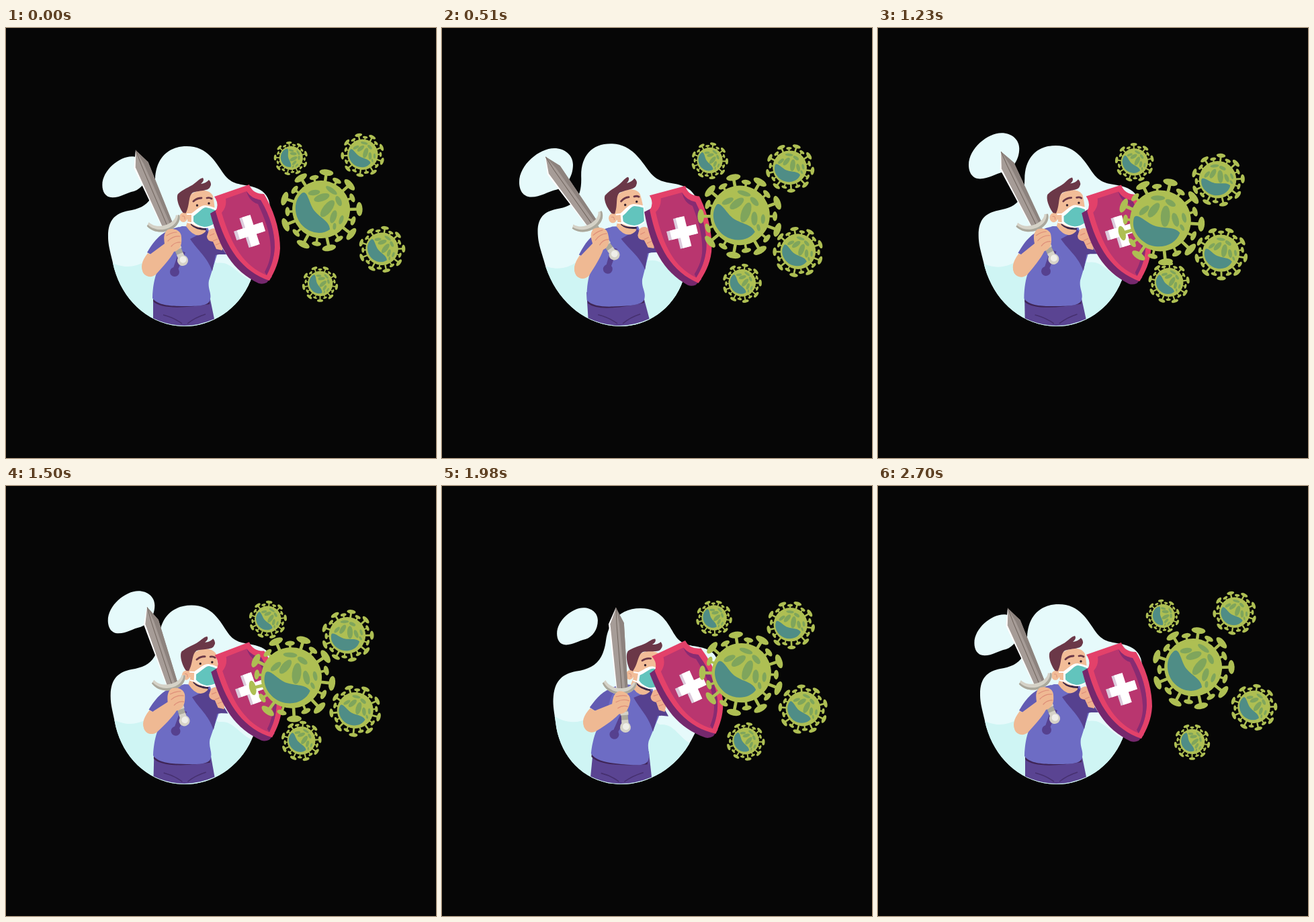
An HTML page that plays this animation: 640x640 px, repeating every 2730 ms.

```html
<!DOCTYPE html>
<html lang="en">
<head>
<meta charset="utf-8">
<title>Shield against viruses</title>
<style>
  html, body { margin: 0; width: 100%; height: 100%; overflow: hidden; background: #060606; }
  svg { display: block; width: 100vw; height: 100vh; }
</style>
</head>
<body>
<svg viewBox="0 0 640 640">
  <defs>
    <path id="cloud" d="M152 310C152 285 163 276 182 272C207 268 221 258 222 225C223 195 240 176 269 176C300 176 312 200 324 217C336 234 350 232 366 236C385 241 393 252 393 270C393 300 380 340 364 376C346 420 305 444 267 444C213 444 174 405 161 358C156 335 152 325 152 310Z"/>
    <clipPath id="cloudClip"><use href="#cloud"/></clipPath>
    <g id="virus">
      <g id="spikes" fill="#aebf53" stroke="#aebf53"></g>
      <circle cx="-1" cy="-1" r="43" fill="#aebf53"/>
      <path fill="#4f8d86" d="M-38 5C-37 -5 -18 8 -6 8C9 8 20 1 30 8C29 24 14 36 -4 36C-22 35 -38 22 -38 5Z"/>
      <g id="spots" fill="#7fa55c"></g>
    </g>
  </defs>

  <path id="puff" fill="#e6fafb" d="M-22 36C-35 36 -40 25 -40 14C-40 -12 -10 -36.5 12 -36.5C28 -36.5 40 -26 40 -12C40 6 30 20 16 25C2 28 -8 36 -22 36Z"/>

  <g id="backdrop">
    <use href="#cloud" fill="#e6fafb"/>
    <g clip-path="url(#cloudClip)">
      <path id="wave" fill="#cff5f4" d="M130 330C163 359 185 360 208 347C240 330 300 340 314 350C336 346 344 368 368 377V470H130Z"/>
    </g>
    <path fill="#5a4492" d="M219 394L219 432Q264 453.5 310 433L302 394Z"/>
    <path fill="none" stroke="#46306f" stroke-width="1.6" d="M234 427Q250 431 262 440M297 426Q281 431 270 440"/>
  </g>

  <g id="man">
    <path fill="#3f2556" d="M219 401Q240 413 303 405L303 411Q235 422 219 407Z"/>
    <path fill="#56418f" d="M296 300C308 306 318 322 328 337L312 337L300 345Z"/>
    <path fill="#625bb2" d="M258 296C232 302 222 314 210 334Q222 342 240 343Z"/>
    <path fill="#6d6cc4" d="M262 295C246 300 238 310 237 340C228 354 219 368 218 402C226 414 250 414 268 414C290 414 303 413 304 403C306 394 300 388 302 376L314 338L300 296Z"/>
    <path fill="#56418f" d="M274 314L299 301C307 310 315 322 317 337L312 338L307 362C299 340 286 332 274 314Z"/>
    <g id="shade" fill="#56418f"><circle cx="251" cy="363" r="7"/><path d="M258 331L267 334L255 362L248 360Z"/></g>
    <path fill="#efb993" d="M271 285L268 295Q283 317 297 303L296 288Z"/>
    <g id="head">
      <path fill="#3b2849" d="M275 290Q284 298 298 298L298 301Q282 301 275 293Z"/>
      <path fill="#f2bd98" d="M272 250C285 239 303 239 308 250C311 264 312 280 309 290L290 297C280 297 270 290 263 272Z"/>
      <path fill="#6b3848" d="M265 277C256 266 253 252 256 247C264 240 270 238 275 235C283 231 287 224 293 223Q296 227 290 232Q298 231 302 226Q307 231 304 236C302 243 290 241 278 245C271 250 274 262 268 275Z"/>
      <ellipse cx="264" cy="282" rx="6" ry="7" fill="#f2bd98"/>
      <path fill="none" stroke="#d9917b" stroke-width="1" d="M262 280Q267 279 266 285"/>
      <path fill="none" stroke="#6b3848" stroke-width="2.8" stroke-linecap="round" d="M279 258Q284 253 291 253M299 253Q303 252 306 254"/>
      <circle cx="284.5" cy="264" r="1.7" fill="#33202c"/>
      <circle cx="302" cy="261" r="1.7" fill="#33202c"/>
      <path fill="none" stroke="#fff" stroke-width="2" d="M269 277L279 277M270 289L279 291"/>
      <path fill="#fff" d="M276 276C285 270 289 264 297 264Q304 265 312 268L311 292Q304 298 295 298Q282 296 276 290Z"/>
      <path fill="#62c4bd" d="M279 280C287 275 292 267 298 267Q304 268 311 271L310 291Q303 296 295 296Q284 294 279 288Z"/>
    </g>
    <path fill="#efb08f" d="M302 301Q308 296 314 300L323 322L322 331L313 329L308 318Q299 317 299 310Z"/>
    <path fill="none" stroke="#dd8d78" stroke-width="1.2" d="M303 309L310 306M308 317L315 314M312 323L319 320"/>
  </g>

  <g id="sword">
    <path fill="#fff" d="M-9 -56L-13 -155L0 -179L0 -56Z"/>
    <path fill="#a69c97" d="M-8 -54L-10.5 -155L0 -178L10 -155L8 -54Z"/>
    <path fill="#8d837e" d="M0 -178L10 -155L8 -54L4 -54L3 -155Z"/>
    <path fill="none" stroke="#71665f" stroke-width="1" d="M0 -178L-1 -155L-1 -54"/>
    <path fill="#aaa89c" d="M-5 -52H5V-6H-5Z"/>
    <path fill="#d5d2c7" d="M-6 -23H6V-18H-6ZM-5 -11H5V-6H-5Z"/>
    <path fill="#d5d2c7" d="M-29 -68L-24 -72C-18 -56 11 -54 17 -66L22 -64C18 -43 -21 -44 -29 -68Z"/>
    <path fill="#aaa89c" d="M-29 -68C-21 -44 18 -43 22 -64L20 -65C14 -48 -17 -48 -27 -69Z"/>
    <circle r="8" fill="#d5d2c7"/>
    <circle cx="1" cy="-1" r="5" fill="#efeee9"/>
  </g>

  <g id="armBase">
    <path fill="#efb993" d="M211 335C201 348 200 357 205 365L220 368L236 342Q222 341 211 335Z"/>
    <g id="arm">
      <path fill="#efb993" d="M217 335C204 345 200 354 204 364C208 371 217 372 223 367C233 356 244 344 250 333C260 330 262 322 261 311C261 302 251 297 241 300C234 305 235 314 236 321Z"/>
      <path fill="none" stroke="#dd8d78" stroke-width="1.2" stroke-linecap="round" d="M239 309Q247 304 254 304M241 317Q249 309 259 310M246 325Q252 318 260 319"/>
    </g>
  </g>

  <g id="shield">
    <path fill="#75286d" d="M304 276L314 270L396 370L388 379Q382 382 376 380C338 362 318 330 304 276Z"/>
    <path fill="#e3416a" d="M310 251L362 233Q367 247 384 247C401 275 408 305 408 328C407 348 400 362 392 376C352 362 328 330 312 273Q318 262 310 251Z"/>
    <path fill="#b9366f" d="M327 254L358 243Q365 254 379 256C394 281 400 305 400 326C399 343 395 355 388 368C354 354 336 325 321 275Q329 266 327 254Z"/>
    <path fill="#882b72" d="M358 243Q365 254 379 256C394 281 400 305 400 326C399 343 395 355 388 368L385 363C391 352 395 340 394 326C393 305 386 285 375 262Q362 258 358 243Z"/>
    <g transform="translate(364 302) rotate(-18)">
      <path fill="#dccbdc" transform="translate(-3 0)" d="M-7 -23H7V-7H21V7H7V23H-7V7H-21V-7H-7Z"/>
      <path fill="#fff" d="M-6 -23H7V-7H21V7H7V23H-6V7H-19V-7H-6Z"/>
    </g>
  </g>

  <g id="viruses"></g>
</svg>
<script>
const $ = id => document.getElementById(id);
const place = (id, transform) => $(id).setAttribute('transform', transform);

function add(parent, tag, attrs) {
  const el = document.createElementNS('http://www.w3.org/2000/svg', tag);
  for (const name in attrs) el.setAttribute(name, attrs[name]);
  return $(parent).appendChild(el);
}

// Long and short spikes alternate around the virus.
for (let i = 0; i < 18; i++) {
  const long = i % 2 === 0;
  const reach = long ? 57 : 50;
  const transform = `rotate(${i * 20 - 42})`;
  add('spikes', 'path', { d: `M0 -41V${-reach}`, 'stroke-width': long ? 4.5 : 3.5, transform });
  add('spikes', 'ellipse', { cy: -reach, rx: long ? 10.5 : 7, ry: long ? 4.7 : 3.5, stroke: 'none', transform });
}

// x, y, rx, ry, angle
const spots = [
  [-13, -31, 10, 3.5, -14], [6, -29, 8, 4, 16], [-14, -13, 5.5, 12, 21], [4, -9, 6.5, 15, -12],
  [-27, -9, 4, 9, 32], [19, -8, 4.5, 10, -32], [30, -14, 3, 7, -30], [31, 0, 2.5, 5, -45]
];
for (const [x, y, rx, ry, angle] of spots)
  add('spots', 'ellipse', { rx, ry, transform: `translate(${x} ${y}) rotate(${angle})` });

const LOOP = 2730, END = 2700;
const times = [0, 510, 735, 960, 1500, 1980, 2340, END];

// Smooth periodic curve through one value per key time.
function curve(values) {
  const last = times.length - 1;
  const slope = i => {
    const wraps = i === 0 || i === last;
    const a = wraps ? last - 1 : i - 1, b = wraps ? 1 : i + 1;
    return (values[b] - values[a]) / (times[b] - times[a] + (wraps ? END : 0));
  };
  return t => {
    let i = 0;
    while (i < last - 1 && t > times[i + 1]) i++;
    const span = times[i + 1] - times[i], s = (t - times[i]) / span, r = 1 - s;
    return values[i] * (1 + 2 * s) * r * r + slope(i) * span * s * r * r
         + values[i + 1] * s * s * (3 - 2 * s) - slope(i + 1) * span * s * s * r;
  };
}

const sway = curve([0, -.65, -.85, -.58, .26, 1, .57, 0]);
const lateRush = curve([0, .5, .75, .96, .87, .46, .21, 0]);
const earlyRush = curve([0, .52, .76, .96, .7, .39, .19, 0]);
const puffX = curve([177, 155, 147, 157.5, 186.5, 201.5, 189.5, 177]);
const puffY = curve([222, 215.5, 207, 198, 188, 209, 217, 222]);
const puffSize = curve([.84, 1, 1.05, 1.01, .87, .76, .78, .84]);

// Each pose is x, y, scale, angle.
const viruses = [
  { rush: earlyRush, from: [424, 194, .41, 75], to: [375, 201, .48, 34] },
  { rush: lateRush, from: [531, 189, .53, 30], to: [505, 228, .65, 8] },
  { rush: earlyRush, from: [559.5, 329.5, .565, 50], to: [503, 337, .655, 17] },
  { rush: earlyRush, from: [467.5, 381, .435, 62], to: [427.5, 379, .51, 41] },
  { rush: lateRush, from: [469, 271.5, 1, 50], to: [419, 289, 1.06, 14] }
];
for (const virus of viruses) virus.el = add('viruses', 'use', { href: '#virus' });

function draw(now) {
  const t = Math.min(now % LOOP, END), u = sway(t);
  const body = `rotate(${5 * u} 267 444)`;

  place('puff', `translate(${puffX(t)} ${puffY(t)}) scale(${puffSize(t)})`);
  place('backdrop', `translate(${267 + u} 444) skewX(${-5.6 * u}) scale(1 ${1 - .022 * u}) translate(-267 -444)`);
  place('wave', `rotate(${4 * u} 267 360)`);
  place('man', body);
  place('armBase', body);
  place('head', `rotate(${4 * u} 282 298)`);
  place('shade', `translate(${-u} ${8 * u})`);
  place('arm', `rotate(${10 * u} 211 362)`);
  place('sword', `translate(${263 + 10 * u} ${346 + 13 * u}) rotate(${18.5 * u - 23})`);
  place('shield', `translate(0 ${-3 * u}) rotate(${-6.3 * u} 362 233)`);

  for (const { rush, from, to, el } of viruses) {
    const p = rush(t);
    const [x, y, size, angle] = from.map((v, i) => v + (to[i] - v) * p);
    el.setAttribute('transform', `translate(${x} ${y}) rotate(${angle}) scale(${size})`);
  }
}

const start = performance.now();
function tick() {
  draw(performance.now() - start);
  requestAnimationFrame(tick);
}
tick();
</script>
</body>
</html>
```
